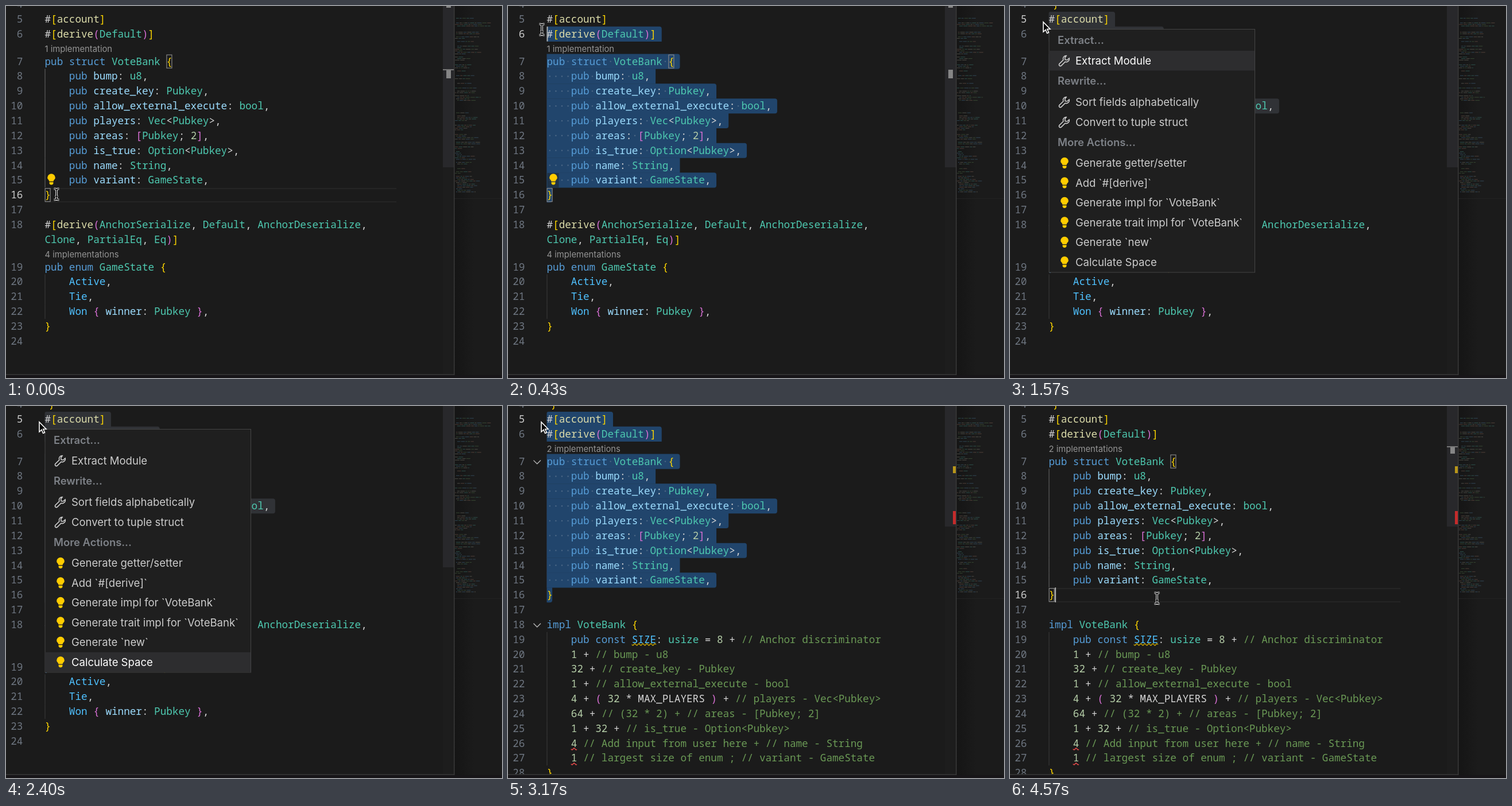
Animation of 864 by 648 pixels, one loop 4610 ms. Source, as an HTML page with a canvas:

```html
<!DOCTYPE html>
<html lang="en">
<head>
<meta charset="utf-8">
<title>Calculate Space</title>
<style>
html, body { margin: 0; width: 100%; height: 100%; overflow: hidden; background: #1b1b1b; }
canvas { display: block; }
</style>
</head>
<body>
<canvas id="stage" width="864" height="648"></canvas>
<script>
const ctx = document.getElementById('stage').getContext('2d');
const LOOP = 4610, LEFT = 67.5, CHAR = 10.59, LINE = 25.84, LENS = 22;
const MONO = '17.65px "Noto Sans Mono", monospace';
const SANS = 'Inter, sans-serif';
const BG = '#1b1b1b';

// Moments at which the state changes, in ms
const UNMATCH = 560, RELEASE = 760, OPEN = 1300, STEP = 1700, STEP_LEN = 100,
  APPLY = 2520, CHECKED = 2950, CLICK = 4330;

// '@' marks a code lens, '~' a wrapped continuation
const head = `
#[account]
#[derive(Default)]
@1
pub struct VoteBank {
    pub bump: u8,
    pub create_key: Pubkey,
    pub allow_external_execute: bool,
    pub players: Vec<Pubkey>,
    pub areas: [Pubkey; 2],
    pub is_true: Option<Pubkey>,
    pub name: String,
    pub variant: GameState,
}

`;
const before = layout(head + `#[derive(AnchorSerialize, Default, AnchorDeserialize,
~Clone, PartialEq, Eq)]
@4
pub enum GameState {
    Active,
    Tie,
    Won { winner: Pubkey },
}
`);
const after = layout(head + `impl VoteBank {
    pub const SIZE: usize = 8 + // Anchor discriminator
    1 + // bump - u8
    32 + // create_key - Pubkey
    1 + // allow_external_execute - bool
    4 + ( 32 * MAX_PLAYERS ) + // players - Vec<Pubkey>
    64 + // (32 * 2) + // areas - [Pubkey; 2]
    1 + 32 + // is_true - Option<Pubkey>
    4 // Add input from user here + // name - String
    1 // largest size of enum ; // variant - GameState
}`);

const menu = [
  [60, 'Extract...'],
  [95, 'Extract Module', 'wrench'],
  [131, 'Rewrite...'],
  [167, 'Sort fields alphabetically', 'wrench'],
  [202, 'Convert to tuple struct', 'wrench'],
  [238, 'More Actions...'],
  [273.5, 'Generate getter/setter', 'bulb'],
  [308, 'Add `#[derive]`', 'bulb'],
  [342.5, 'Generate impl for `VoteBank`', 'bulb'],
  [377, 'Generate trait impl for `VoteBank`', 'bulb'],
  [411.5, 'Generate `new`', 'bulb'],
  [446, 'Calculate Space', 'bulb'],
];
const actions = menu.filter(item => item[2]);

const mousePath = [[0, 88, 328], [30, 88, 328], [430, 59, 41], [700, 58, 28],
  [3230, 58, 28], [3760, 265, 296], [4250, 256, 335], [LOOP, 256, 335]];

const shapes = {
  bulb: new Path2D('M-6.8-3a6.8 6.8 0 1 1 13.6 0c0 3-3 3.8-3.2 6.6h-7.2c-.2-2.8-3.2-3.6-3.2-6.6zM-3.4 4.8h6.8v2.6q-1 2-3.4 2t-3.4-2z'),
  wrench: new Path2D('M13.5 1.6A5.3 5.3 0 0 0 8.3 9L1.6 15.6A2.3 2.3 0 0 0 4.9 18.9L11.6 12.2A5.3 5.3 0 0 0 18.6 6L15.2 9L11.6 8.6L11.2 5Z'),
  arrow: new Path2D('M0 0V17L4 13.3L6.6 19.5L9.4 18.3L6.8 12.3H12Z'),
  beam: new Path2D('M-4.5-9.5h1.5q3 0 3 2.5q0-2.5 3-2.5h1.5M0-7V7M-4.5 9.5h1.5q3 0 3-2.5q0 2.5 3 2.5h1.5M-2.5 3.5h5'),
};

function tokenize(text) {
  const bracket = ['#ffd700', '#da70d6', '#179fff'];
  let depth = text.startsWith('Clone') ? 2 : /^[ }]/.test(text) ? 1 : 0;
  return [...text.matchAll(/\/\/.*|\w+|[^\s\w]/g)].map(({ 0: word, index }) => {
    let color = '#d4d4d4';
    if (word.startsWith('//')) color = '#6a9955';
    else if (/^[[({]$/.test(word)) color = bracket[depth++];
    else if (/^[\])}]$/.test(word)) color = bracket[--depth];
    else if (/^(pub|struct|enum|impl|const)$/.test(word)) color = '#569cd6';
    else if (/^(derive|account)$/.test(word)) color = '#dcdcaa';
    else if (/^(Active|Tie|Won|SIZE)$/.test(word)) color = '#4fc1ff';
    else if (/^\d/.test(word)) color = '#b5cea8';
    else if (/^(u8|bool|usize|[A-Z][a-z]\w*)$/.test(word)) color = '#4ec9b0';
    else if (/^[a-z]/.test(word)) color = '#9cdcfe';
    return { word, color, col: index };
  });
}

function layout(source) {
  let top = -15.9, n = 4;
  return source.split('\n').map(line => {
    const lens = line[0] === '@', wrapped = line[0] === '~';
    const text = lens || wrapped ? line.slice(1) : line;
    const row = { top, text, lens, n: lens || wrapped ? null : n++, tokens: lens ? [] : tokenize(text) };
    top += lens ? LENS : LINE;
    return row;
  });
}

const colX = col => LEFT + col * CHAR;
const rowOf = (rows, n) => rows.find(row => row.n === n);

function rect(x, y, w, h, color) {
  ctx.fillStyle = color;
  ctx.fillRect(x, y, w, h);
}

function write(text, x, y, color, font, align = 'left') {
  ctx.font = font;
  ctx.textAlign = align;
  ctx.fillStyle = color;
  ctx.fillText(text, x, y);
}

function shape(name, x, y, fill, stroke, width) {
  ctx.save();
  ctx.translate(x, y);
  if (fill) { ctx.fillStyle = fill; ctx.fill(shapes[name]); }
  if (stroke) { ctx.strokeStyle = stroke; ctx.lineWidth = width; ctx.stroke(shapes[name]); }
  ctx.restore();
}

function line(points, color, width) {
  ctx.beginPath();
  points.forEach(([x, y]) => ctx.lineTo(x, y));
  ctx.strokeStyle = color;
  ctx.lineWidth = width;
  ctx.stroke();
}

function squiggle(x, y, width, color) {
  const points = [];
  for (let d = 0; d <= width; d++) points.push([x + d, y + 1.5 * Math.sin(d * 0.9)]);
  line(points, color, 1.4);
}

function mouseAt(t) {
  const i = mousePath.findIndex(p => p[0] > t);
  const [t0, x0, y0] = mousePath[i - 1], [t1, x1, y1] = mousePath[i];
  const u = (t - t0) / (t1 - t0), k = u * u * (3 - 2 * u);
  return { x: x0 + (x1 - x0) * k, y: y0 + (y1 - y0) * k };
}

function caretAt(rows, t) {
  if (t >= CLICK) return { n: 16, col: 1 };
  const { x, y } = mouseAt(Math.min(t, RELEASE));
  const row = rows.filter(r => r.n && r.top <= y).pop();
  const col = Math.round((x - LEFT) / CHAR);
  return { n: row.n, col: Math.max(0, Math.min(row.text.length, col)) };
}

function drawMinimap() {
  let seed = 11;
  const random = () => (seed = (seed * 16807) % 2147483647) / 2147483647;
  const colors = ['#4c6b45', '#456a83', '#3f7c72', '#77776a', '#7c5f51'];
  const shade = ctx.createLinearGradient(781, 0, 815, 0);
  shade.addColorStop(0, '#151515');
  shade.addColorStop(1, BG);
  rect(781, 0, 83, 648, shade);
  ctx.globalAlpha = 0.5;
  for (let y = 10; y < 330; y += 2.7) {
    if (random() < 0.48) continue;
    let x = 782 + Math.floor(random() * 3) * 2;
    const end = x + (y > 22 && y < 36 ? 40 + random() * 32 : 6 + random() * 36);
    while (x < end) {
      const w = 2 + random() * 6;
      rect(x, y, w, 1.1, colors[Math.floor(random() * colors.length)]);
      x += w + 1.2;
    }
  }
  ctx.globalAlpha = 1;
  rect(781, 335, 83, 1, '#222');
  rect(780, 0, 1.5, 648, '#3a3a3a');
}

function drawRuler(t, matched, selected) {
  const applied = t >= APPLY;
  rect(761, 0, 19, 642, '#1d1d1d');
  rect(761, 0, 19, applied ? 210 : 281, '#28282b');
  if (matched) {
    const y = applied ? 71 : 111;
    rect(767, y, 8, applied ? 12 : 15, '#858585');
    if (!applied) rect(767, 0, 8, 3, '#858585');
    if (!selected) rect(761, y - 1, 19, 2, '#777');
  }
  if (t >= CHECKED) {
    rect(775, 105, 5, 12, '#b8961a');
    rect(775, 183, 5, 23, '#c42b2b');
  }
}

function drawGuides(rows, bright) {
  const indented = rows.filter(row => row.text.startsWith('    '));
  for (const row of indented) {
    rect(67.5, row.top, 1, LINE, bright && row.n < 16 ? '#6a6a6a' : '#3c3c3c');
  }
}

function drawSelection(rows, caret, color) {
  const span = rows.filter(r => r.n >= caret.n && r.n <= 16 && r.n);
  const edge = r => r ? colX(r.text.length + (r.n < 16 ? 1 : 0)) - 1 : 0;
  span.forEach((row, i) => {
    const from = i ? 0 : caret.col, right = edge(row);
    const round = other => edge(other) < right ? 4 : 0;
    ctx.fillStyle = color;
    ctx.beginPath();
    ctx.roundRect(colX(from), row.top, right - colX(from), LINE + 0.3,
      [i ? 0 : 3, row.n === 6 ? 4 : round(span[i - 1]), round(span[i + 1]), 0]);
    ctx.fill();
    for (let col = from; col < row.text.length; col++) {
      if (row.text[col] !== ' ') continue;
      ctx.beginPath();
      ctx.arc(colX(col + 0.5), row.top + 13, 1.2, 0, 7);
      ctx.fillStyle = 'rgba(227,228,226,.22)';
      ctx.fill();
    }
  });
}

function drawCode(rows, activeLine, checked) {
  for (const row of rows) {
    const base = row.top + 19;
    if (row.lens) {
      const count = checked ? 2 : +row.text;
      write(`${count} implementation${count > 1 ? 's' : ''}`, LEFT, row.top + 18.2, '#949494', '14.8px ' + SANS);
      continue;
    }
    if (row.n) write(row.n, 29.3, base, row.n === activeLine ? '#ccc' : '#6e7681', MONO, 'right');
    for (const { word, color, col } of row.tokens) write(word, colX(col), base, color, MONO);
  }
}

function drawBracketBoxes(rows) {
  ctx.strokeStyle = '#858585';
  ctx.lineWidth = 1.2;
  for (const [n, col] of [[7, 20], [16, 0]]) {
    ctx.strokeRect(colX(col) + 0.6, rowOf(rows, n).top + 1.5, 9, 23);
  }
}

function drawMenu(focused) {
  rect(67.5, 40, 359.5, 424.5, '#454545');
  rect(68.5, 41, 357.5, 422.5, '#1f1f1f');
  for (const item of menu) {
    const [y, label, icon] = item, on = item === focused;
    if (!icon) {
      write(label, 83, y + 6.3, '#7d8187', '600 18.4px ' + SANS);
      continue;
    }
    if (on) rect(68.5, y - 17, 357.5, 34.5, '#2d2d2f');
    if (icon === 'bulb') shape('bulb', 95, y, '#fc0');
    else shape('wrench', 84.5, y - 10, null, '#ccc', 1.6);
    write(label, 114, y + 6.7, on ? '#fff' : '#ccc', '18.5px ' + SANS);
  }
}

function drawMouse({ x, y }, beam) {
  if (beam) {
    shape('beam', x, y, null, '#fff', 3.6);
    shape('beam', x, y, null, '#000', 1.6);
  } else {
    shape('arrow', x, y, '#000', '#fff', 1.6);
  }
}

function draw(t) {
  const rows = t < APPLY ? before : after;
  const caret = caretAt(rows, t), mouse = mouseAt(t);
  const selected = caret.n < 16 || caret.col < 1;
  const menuOpen = t >= OPEN && t < APPLY;
  const matched = t < UNMATCH || t >= CLICK;
  const checked = t >= CHECKED;

  rect(0, 0, 864, 648, BG);
  drawMinimap();
  drawRuler(t, matched, selected);

  ctx.save();
  ctx.beginPath();
  ctx.rect(0, 0, 761, 641);
  ctx.clip();
  if (!selected) {
    const { top } = rowOf(rows, 16);
    rect(68, top + 1, 612, 1.6, '#282828');
    rect(68, top + LINE - 1.6, 612, 1.6, '#282828');
  }
  drawGuides(rows, !selected);
  if (selected) drawSelection(rows, caret, menuOpen ? '#303236' : '#21456c');
  if (matched) drawBracketBoxes(rows);
  drawCode(rows, caret.n, checked);
  if (t >= UNMATCH) write('}', 74.5, 2.5, '#ffd700', MONO);

  if (t < UNMATCH) {
    if (caret.n < 15) rect(68.5, 291, 20, 25, 'rgba(27,27,27,.45)');
    shape('bulb', 79, 302, '#fc0');
  }
  if (checked) {
    squiggle(colX(14), 415.5, 42, '#cca700');
    squiggle(colX(4), 597.5, 10, '#f14c4c');
    squiggle(colX(4), 623.5, 10, '#f14c4c');
  }
  if (t >= RELEASE && !menuOpen && mouse.x < LEFT) {
    for (const row of rows.filter(r => /^(pub|impl)/.test(r.text))) {
      const y = row.top + 14;
      line([[44.5, y - 3], [50.7, y + 3.2], [57, y - 3]], '#b5b5b5', 1.4);
    }
  }

  const blinkStart = [CLICK, APPLY, RELEASE, 30].find(start => t >= start);
  const dragging = t < RELEASE;
  if (!menuOpen && t >= 30 && (dragging || (t - blinkStart) % 1000 < 500)) {
    rect(colX(caret.col), rowOf(rows, caret.n).top, 2, LINE, '#aeafad');
  }
  if (menuOpen) {
    const step = Math.floor((t - STEP) / STEP_LEN) + 1;
    drawMenu(actions[Math.max(0, Math.min(actions.length - 1, step))]);
  }
  ctx.restore();

  rect(0, 641, 780, 2, '#303030');
  rect(0, 643, 864, 5, '#171518');
  drawMouse(mouse, dragging || mouse.x > LEFT);
}

function tick() {
  draw(performance.now() % LOOP);
  requestAnimationFrame(tick);
}
tick();
</script>
</body>
</html>
```
